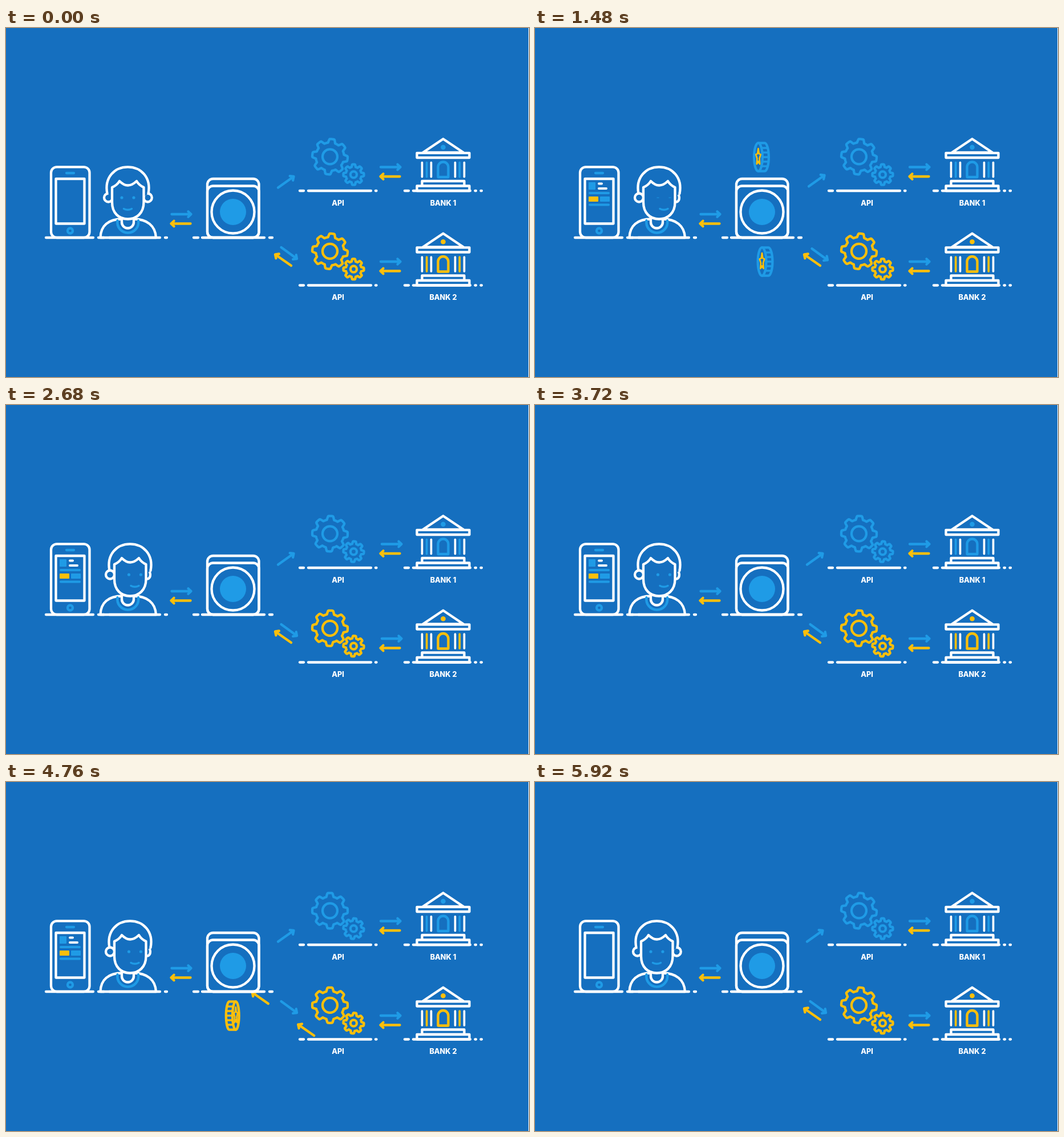
These frames come from a looping animation (917 by 611 pixels, 6.36 s). An HTML page with a canvas:

```html
<!DOCTYPE html>
<html lang="en">
<head>
<meta charset="utf-8">
<title>Payment flow</title>
<style>
html, body { margin: 0; width: 100%; height: 100%; overflow: hidden; background: #156fbf; }
canvas, svg { position: absolute; left: 0; top: 0; width: 917px; height: 611px; }
text { font: 800 12.7px Inter, "Open Sans", sans-serif; fill: #fff; text-anchor: middle; }
</style>
</head>
<body>
<canvas id="stage" width="917" height="611"></canvas>
<svg viewBox="0 0 917 611">
  <text x="582" y="310.5">API</text>
  <text x="766.5" y="310.5">BANK 1</text>
  <text x="582" y="476">API</text>
  <text x="766.5" y="476">BANK 2</text>
</svg>
<script>
const BG = '#156fbf', WHITE = '#fff', BLUE = '#1f9be6', GOLD = '#fdbf0a';
const LOOP = 6360, STEP = 40, ROW = 165.5;
const c = document.getElementById('stage').getContext('2d');
c.lineCap = c.lineJoin = 'round';

const clamp = v => Math.max(0, Math.min(1, v));
const ramp = (t, from, length) => clamp((t - from) / length);
const ease = p => p < .5 ? 2 * p * p : 1 - 2 * (1 - p) ** 2;
const move = (t, from, length) => ease(ramp(t, from, length));
const backOut = p => 1 + 2.7 * (p - 1) ** 3 + 1.7 * (p - 1) ** 2;
const hump = (t, from, length) => Math.sin(Math.PI * ramp(t, from, length));

function shape(path, stroke, fill, width = 4.3) {
  const p = typeof path === 'string' ? new Path2D(path) : path;
  if (fill) { c.fillStyle = fill; c.fill(p); }
  if (stroke) { c.strokeStyle = stroke; c.lineWidth = width; c.stroke(p); }
}
function ellipse(x, y, rx, ry = rx) {
  const p = new Path2D();
  p.ellipse(x, y, rx, ry, 0, 0, 7);
  return p;
}
function box(x1, y1, x2, y2, r = 0) {
  const p = new Path2D();
  p.roundRect(x1, y1, x2 - x1, y2 - y1, r);
  return p;
}
function closed(count, point) {
  const p = new Path2D();
  for (let i = 0; i < count; i++) p.lineTo(...point(i));
  p.closePath();
  return p;
}
function at(x, y, draw) {
  c.save();
  c.translate(x, y);
  draw();
  c.restore();
}
function ground(y, ...spans) {
  for (const [a, b] of spans) shape(`M${a} ${y}H${b}`, WHITE);
}

// An arrow leaves behind one icon while its successor follows, "gap" behind it.
function arrow(t, color, x1, y1, x2, y2, gap, from, length) {
  const p = move(t, from, length);
  const size = Math.hypot(x2 - x1, y2 - y1);
  at(x1, y1, () => {
    c.rotate(Math.atan2(y2 - y1, x2 - x1));
    for (const s of p > 0 && p < 1 ? [p * gap, (p - 1) * gap] : [0])
      shape(`M${s} 0h${size}m-5 -4.7l5 4.7l-5 4.7`, color);
  });
}

function coin(x, y, turn, scale, rim, starColor) {
  const R = 24.7, cos = Math.cos(turn);
  const rx = Math.max(.5, R * Math.abs(cos));
  const f = Math.sin(turn) * Math.sign(cos) * 5.8;
  const side = f > 0 ? -1 : 1;
  at(x, y, () => {
    c.scale(scale, scale);
    const edge = new Path2D();
    edge.ellipse(-f, 0, rx, R, 0, -Math.PI / 2, Math.PI / 2, side < 0);
    edge.lineTo(f, R);
    edge.lineTo(f, -R);
    edge.closePath();
    shape(edge, rim, BG);
    for (let v = -16; v <= 16; v += 8) {
      const e = side * rx * Math.sqrt(1 - (v / R) ** 2);
      shape(`M${f + e} ${v}L${e - f} ${v}`, rim, null, 3.4);
    }
    shape(ellipse(f, 0, rx, R), rim, BG);
    shape(closed(10, i => {
      const a = i * Math.PI / 5, r = i % 2 ? 7.5 : 15;
      return [f + Math.sin(a) * r * rx / R, -Math.cos(a) * r];
    }), starColor, null, 2.7);
  });
}

function coins(t) {
  const spin = Math.PI * 2 / 1000;
  if (t > 700 && t < 2520) {
    const out = 91.5 * move(t, 700, 620);
    for (const [dir, from] of [[-1, 1480], [1, 1336]]) {
      const go = move(t, from, 1040);
      coin(397 + 171 * go, 317.5 + dir * out, -1.27 + (t - 1480) * spin,
        1 - clamp((go - .7) / .3), BLUE, GOLD);
    }
  }
  if (t > 3760 && t < 5570) {
    const go = move(t, 3745, 1040);
    coin(568 - 171 * go, 409 - 91.5 * move(t, 4930, 640),
      .96 - (t - 4320) * spin, clamp(go / .3), GOLD, GOLD);
  }
}

function arrows(t) {
  arrow(t, BLUE, 290.5, 326, 324.5, 326, 120, 340, 580);
  arrow(t, GOLD, 323.5, 342.5, 289.5, 342.5, 120, 5030, 580);
  arrow(t, BLUE, 477, 279.5, 504.5, 260, 98, 1392, 640);
  arrow(t, BLUE, 482.5, 384, 510, 404, 98, 1392, 640);
  arrow(t, GOLD, 500, 416, 472, 396.5, 98, 4440, 640);
  c.save();
  c.clip(box(631, 0, 917, 611));
  for (const y of [243.5, 243.5 + ROW]) {
    arrow(t, BLUE, 657, y, 691.5, y, 90, 2613, 640);
    arrow(t, GOLD, 690.5, y + 16.5, 656.5, y + 16.5, 90, 3800, 640);
  }
  c.restore();
}

function gear(x, y, teeth, root, tip, hole, turn, color) {
  shape(closed(216, i => {
    const a = i * Math.PI / 108;
    const r = root + (tip - root) * clamp(.5 + 1.1 * Math.cos(teeth * a));
    return [x + r * Math.sin(a + turn), y - r * Math.cos(a + turn)];
  }), color, BG);
  shape(ellipse(x, y, hole), color);
}
function gears(t, color) {
  const turn = 3.84 * (move(t, 1440, 2260) - move(t, 3800, 1360));
  gear(568, 225.3, 8, 24.8, 31, 13, .12 + turn, color);
  gear(609.5, 256.7, 8, 13.8, 18, 5.5, -turn, color);
  ground(285, [515, 522], [530, 640], [648, 649.5]);
}

function bank(t, color) {
  shape(box(729.5, 268, 803.5, 276.5), WHITE, BG);
  shape(box(720.5, 276.5, 812.5, 285), WHITE, BG);
  for (const x of [729.5, 745.5, 787.5, 803.5]) shape(`M${x} 235.5V260.5`, WHITE, null, 3.7);
  for (const x of [737.7, 795.3]) shape(`M${x} 235.5V260.5`, color, null, 3.7);
  shape('M757.5 261V243.5a9 9 0 0 1 18 0V261Z', color);
  at(0, -9 * (hump(t, 2900, 440) + hump(t, 3840, 440)), () => {
    shape('M731 218L766.5 194.3L802 218Z', WHITE, BG);
    shape(box(720.5, 218.8, 812.5, 227), WHITE, BG);
    shape(ellipse(766.5, 208.8, 4.3), null, color);
  });
  ground(285, [699, 706], [714, 814], [822.5, 824], [832.5, 834]);
}

const screen = [
  [94, 270, 12, 13, BLUE], [110, 270.5, 9, 4, WHITE], [110, 279, 17, 4, WHITE],
  [94, 287, 37, 4, BLUE], [94, 295, 17, 9, GOLD], [114, 295, 17, 9, BLUE],
  [94, 307.5, 37, 4, BLUE]
];
function phone(t) {
  shape(box(79, 243.3, 146.5, 367, 10), WHITE, BG);
  shape(box(87.5, 264, 137.5, 342.5), WHITE);
  shape('M106 254H119', BLUE);
  shape(ellipse(112.5, 355, 4.5), BLUE);
  screen.forEach(([x, y, w, h, color], i) => {
    const k = backOut(ramp(t, 80 + 50 * i, 200)) * backOut(1 - ramp(t, 5720 - 50 * i, 200));
    if (k <= 0) return;
    at(x + w / 2, y + h / 2, () => {
      c.scale(k, k);
      shape(box(-w / 2, -h / 2, w / 2, h / 2, h < 5 ? 2 : 1), null, color);
    });
  });
}

function person(t) {
  const k = move(t, 80, 400) - move(t, 5400, 420);
  const open = 1 - .8 * (hump(t, 1400, 160) + hump(t, 5760, 160));
  const ear = () => shape(ellipse(179.5 + 3 * k, 297, 7.5), WHITE, BG);

  shape('M165.5 367C166 346 180 334.5 203 334.5H224C247 334.5 262 346 263 367Z', WHITE, BG);
  shape('M195.5 337a18.5 18.5 0 1 0 36.5 0', BLUE);
  shape('M203 333V340a10.5 10.5 0 0 0 21 0V333', WHITE, BG);

  shape(ellipse(248 + .5 * (1 - k), 297, 5 + 2.3 * (1 - k), 7.5), WHITE, BG);
  if (k < .5) ear();
  at(4 * k, 0, () => {
    shape('M177.5 290C172 262 190 243.3 213.5 243.3S255 262 249.5 290L241 296V278H186V296Z', null, BG);
    shape('M177.5 290C172 262 190 243.3 213.5 243.3S255 262 249.5 290', WHITE);
    shape('M186 279Q195 275 199 268Q213.5 283 229 268Q233 275 241.5 279' +
      'V305C241.5 324 229 334.5 213.5 334.5S186 324 186 305Z', WHITE, BG);
  });
  if (k >= .5) ear();

  at(12.5 * k, 0, () => {
    for (const x of [203, 224]) shape(ellipse(x, 297, 2.6, 2.6 * open), null, BLUE);
    shape('M206.5 316.5Q213.5 320 220.5 316.5', BLUE, null, 3.5);
  });
}

function app() {
  shape(box(353, 264, 443.5, 367, 10), WHITE, BG);
  shape(box(353, 276.5, 443.5, 367, 10), WHITE);
  shape(ellipse(398, 322, 37.5), WHITE);
  shape(ellipse(398, 322, 23), null, BLUE);
}

function draw(now) {
  const t = Math.floor(now % LOOP / STEP) * STEP;
  c.fillStyle = BG;
  c.fillRect(0, 0, 917, 611);
  coins(t);
  arrows(t);
  [BLUE, GOLD].forEach((color, row) => at(0, row * ROW, () => {
    gears(t, color);
    bank(t, color);
  }));
  phone(t);
  person(t);
  app();
  ground(367, [70, 153], [162, 172], [181, 270], [279, 282], [329, 337], [344, 453], [462, 467]);
  shape(box(916, 0, 917, 611), null, WHITE);
}

const start = performance.now();
function tick() {
  draw(performance.now() - start);
  requestAnimationFrame(tick);
}
tick();
</script>
</body>
</html>
```
